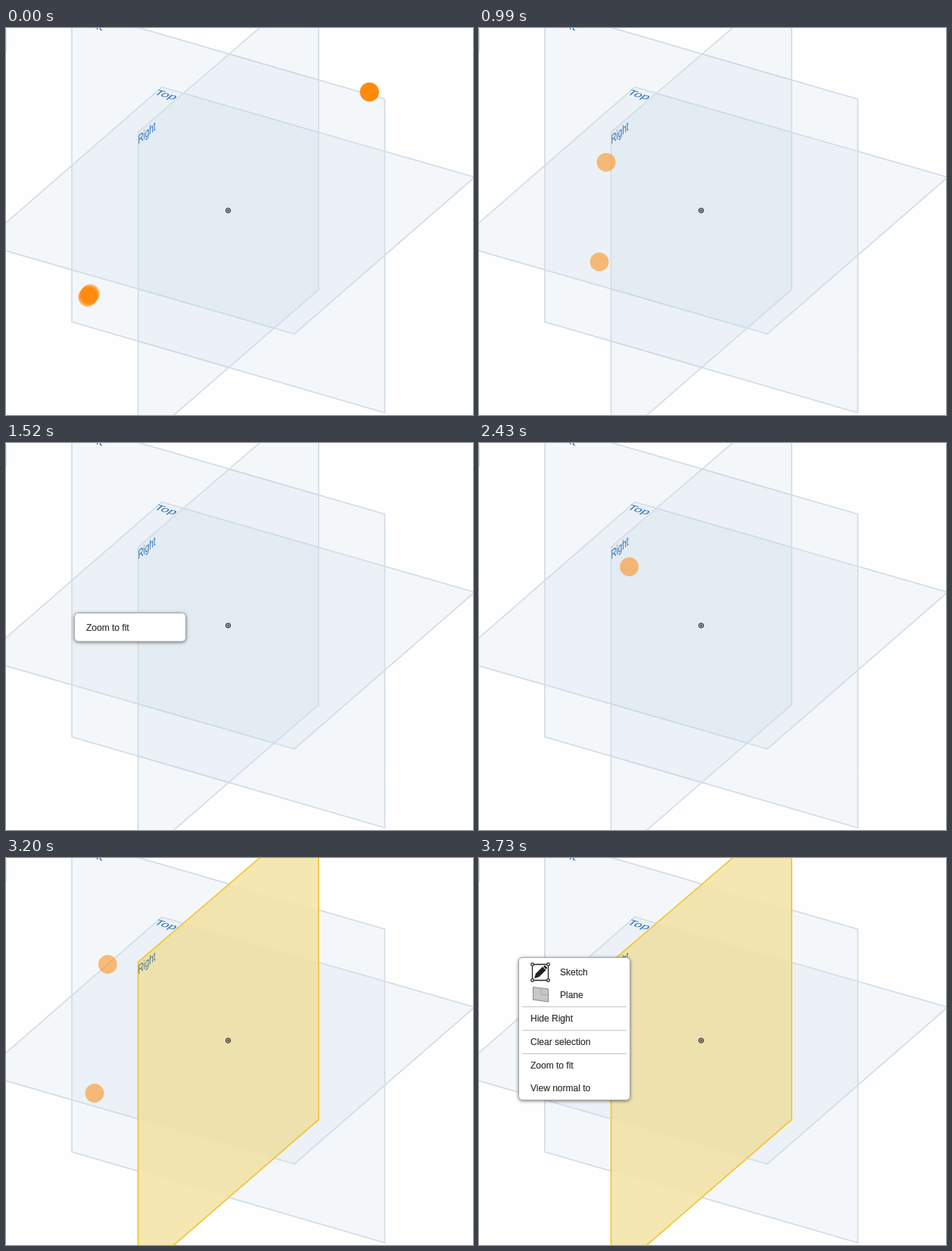
An HTML page for the animation above (4930 ms loop, 617 px wide and 511 px high).

```html
<!DOCTYPE html>
<html lang="en">
<head>
<meta charset="utf-8">
<style>
  html, body { margin: 0; width: 100%; height: 100%; overflow: hidden; background: #fefefe; }
  svg { display: block; width: 617px; height: 511px; font-family: Arial, "Liberation Sans", sans-serif; }
  .plane { fill: rgba(125,160,200,.075); }
  .edge { fill: none; stroke: #d4dee7; stroke-width: 1.8; }
  .label { font-size: 17px; fill: #2c6eb4; }
  .selected #right { fill: rgba(240,216,123,.58); stroke: #f3c63c; }
  .selected #rightLabel { fill: #49727e; }
  .selected #edges { clip-path: url(#outsideRight); }
  .menu > rect { fill: #fff; stroke: #a9a9a9; filter: drop-shadow(0 1px 2px rgba(0,0,0,.5)); }
  .menu text { font-size: 12px; fill: #333; stroke: #333; stroke-width: .2; }
  .menu .rule { stroke: #c6c6c6; }
  #touches { fill: #ff8400; fill-opacity: .52; }
</style>
</head>
<body>
<svg id="stage" viewBox="0 0 617 511">
  <defs>
    <path id="frontShape" d="M87 -26L500.500 94V508L87 388Z"/>
    <path id="topShape" d="M206 78L619 197L381 404L-32 285Z"/>
    <clipPath id="outsideRight">
      <path clip-rule="evenodd" d="M-40 -80H660V600H-40ZM174.500 137.500L413 -67V345.500L174.500 552Z"/>
    </clipPath>
  </defs>
  <path d="M0 2V31" stroke="#bbb"/>
  <g class="plane"><use href="#frontShape"/><use href="#topShape"/></g>
  <g id="edges" class="edge"><use href="#frontShape"/><use href="#topShape"/></g>
  <text class="label" transform="matrix(1 .29 0 1 87.500 -8)">Front</text>
  <text class="label" transform="matrix(1 .29 -.575 .5 194.500 87)">Top</text>
  <path id="right" class="plane" stroke="#d4dee7" stroke-width="1.8" d="M174.500 137.500L413 -67V345.500L174.500 552Z"/>
  <text id="rightLabel" class="label" transform="matrix(.577 -.494 0 1 174.500 154)">Right</text>
  <g fill="#555" fill-opacity=".5" stroke="#333">
    <circle cx="293.500" cy="241" r="3.200"/><circle cx="293.500" cy="241" r=".7"/>
  </g>

  <g id="viewMenu" class="menu">
    <rect x="90.500" y="224.500" width="147" height="37.500" rx="5"/>
    <text x="106" y="248">Zoom to fit</text>
  </g>

  <g id="planeMenu" class="menu">
    <rect x="52.500" y="131.500" width="147" height="188" rx="5"/>
    <path class="rule" d="M57 196.500H195M57 227.500H195M57 258.500H195"/>
    <g fill="#fff" stroke="#222" stroke-width="1.300">
      <path d="M70.500 140.500H91.500V161.500H70.500Z"/>
      <circle cx="70.500" cy="140.500" r="1.800"/><circle cx="91.500" cy="140.500" r="1.800"/>
      <circle cx="70.500" cy="161.500" r="1.800"/><circle cx="91.500" cy="161.500" r="1.800"/>
      <path d="M74 158L75.500 153L84 144.500L87.500 148L79 156.500Z" fill="#222"/>
      <path d="M86 142.500L89.500 146" stroke-width="2.500"/>
    </g>
    <path d="M71.500 170.500L91.500 173V190L71.500 187Z" fill="#c5c8c9" stroke="#888"/>
    <path d="M82 172V180L91 181" fill="none" stroke="#a3a6a7"/>
    <text x="107" y="155">Sketch</text>
    <text x="107" y="185">Plane</text>
    <text x="68" y="216">Hide Right</text>
    <text x="68" y="247">Clear selection</text>
    <text x="68" y="278">Zoom to fit</text>
    <text x="68" y="308">View normal to</text>
  </g>
  <g id="touches"></g>
</svg>
<script>
const LOOP = 4930;
const byId = id => document.getElementById(id);
const timed = [
  { node: byId("viewMenu"), from: 1050, to: 2430 },
  { node: byId("planeMenu"), from: 3260, to: LOOP }
];

function addTouch(x, y, from, to) {
  const node = document.createElementNS("http://www.w3.org/2000/svg", "circle");
  node.setAttribute("cx", x);
  node.setAttribute("cy", y);
  node.setAttribute("r", 12.4);
  byId("touches").append(node);
  timed.push({ node, from, to });
}

// The pinch leaves overlapping marks that vanish oldest first.
for (let i = 0; i < 4; i++) {
  const end = 70 + i * 190 / 3;
  addTouch(480.5 - i * 0.2, 84.8 - i * 0.2, 0, end);
  addTouch(111.3 - i * 1.2, 350.7 + i * 1.6, 0, end);
}
addTouch(168, 177.3, 990, 1520);
addTouch(159, 308.8, 990, 1520);
addTouch(198.5, 163.5, 2430, 2960);
addTouch(134.3, 140.5, 3200, 3730);
addTouch(117, 310.5, 3200, 3730);

const start = performance.now();
function draw() {
  const t = (performance.now() - start) % LOOP;
  for (const { node, from, to } of timed) {
    node.style.display = t >= from && t < to ? "" : "none";
  }
  byId("stage").classList.toggle("selected", t >= 2780);
  requestAnimationFrame(draw);
}
draw();
</script>
</body>
</html>
```
